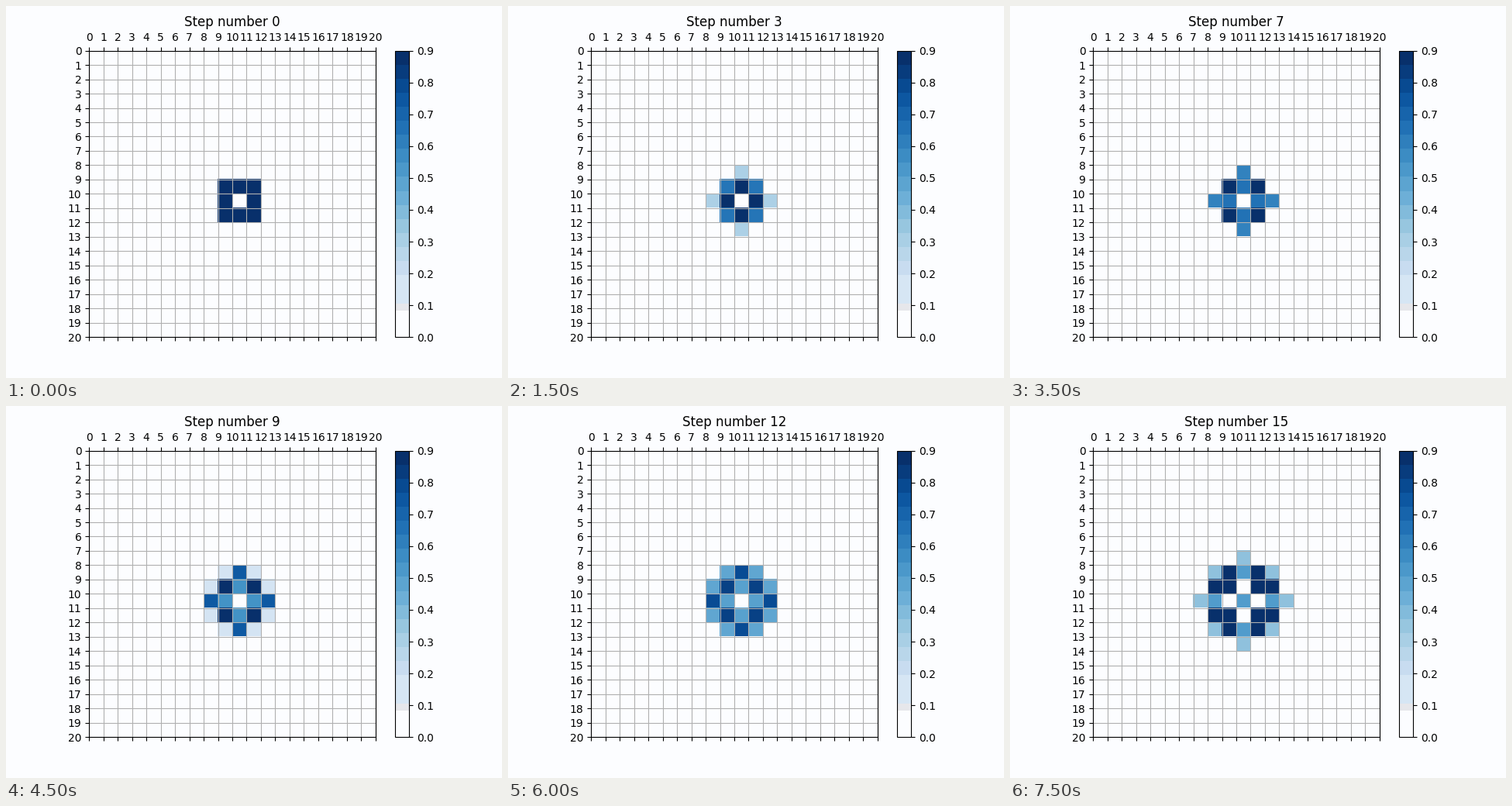
A matplotlib script that plays this animation: 640x480 px, repeating every 8 s.

```python
import numpy as np
import matplotlib.pyplot as plt
from matplotlib.animation import FuncAnimation
from matplotlib.cm import ScalarMappable
from matplotlib.colors import BoundaryNorm, ListedColormap, Normalize

SIZE, MID, REACH = 20, 10, 3
TOP, STEPS = 0.9, 16
PAPER, MIST = "#fcfdff", "#e6e7eb"
BLUES = plt.get_cmap("Blues")


def ramp(t, start, end):
    return np.clip((t - start) / (end - start), 0, 1)


def bump(t, mid, width):
    return max(0, 1 - abs(t - mid) / width)


def ring_levels(t):
    """Level of each symmetric ring, keyed by (longer, shorter) offset."""
    late = ramp(t, 13, 15)
    return {
        (0, 0): 0.15 * bump(t, 11, 1) + 0.52 * late,
        (1, 0): TOP - 0.4 * ramp(t, 3, 10) - 0.5 * late,
        (1, 1): TOP - 0.24 * bump(t, 3, 3) - 0.12 * bump(t, 13, 2),
        (2, 0): TOP * ramp(t, 0, 11) ** 0.85 - 0.38 * ramp(t, 11, 15),
        (2, 1): 0.48 * ramp(t, 8, 11) + 0.42 * late,
        (2, 2): 0.37 * late,
        (3, 0): 0.47 * (t > 12) - 0.1 * late,
    }


def grid_at(step):
    levels = ring_levels(step)
    grid = np.zeros((SIZE, SIZE))
    for dy in range(-REACH, REACH + 1):
        for dx in range(-REACH, REACH + 1):
            far, near = max(abs(dx), abs(dy)), min(abs(dx), abs(dy))
            grid[MID + dy, MID + dx] = levels.get((far, near), 0)
    return np.ma.masked_less(grid, 0.01)


def color_bands(count=16):
    """Paper, a thin grey band, one wide pale band, then even steps of blue."""
    edges = np.r_[0, 0.083, 0.105, np.linspace(0.195, TOP, count + 1)]
    colors = [PAPER, MIST, BLUES(0.165), *BLUES(np.linspace(0.24, 1, count))]
    return ScalarMappable(BoundaryNorm(edges, len(colors)), ListedColormap(colors))


fig, ax = plt.subplots(figsize=(6.4, 4.8), dpi=100, facecolor=PAPER)
ax.set_facecolor(PAPER)
image = ax.matshow(grid_at(0), cmap=BLUES, norm=Normalize(0, TOP),
                   extent=(0, SIZE, SIZE, 0))
ax.set_xticks(range(SIZE + 1))
ax.set_yticks(range(SIZE + 1))
ax.grid(True)
bar = fig.colorbar(color_bands(), ax=ax, spacing="proportional",
                   ticks=np.arange(10) / 10, format="%.1f")
bar.ax.minorticks_off()
title = ax.set_title("Step number 0")


def update(step):
    image.set_data(grid_at(step))
    title.set_text(f"Step number {step}")
    return image, title


anim = FuncAnimation(fig, update, frames=STEPS, interval=500,
                     repeat=True, repeat_delay=0, blit=False)
plt.show()
```
